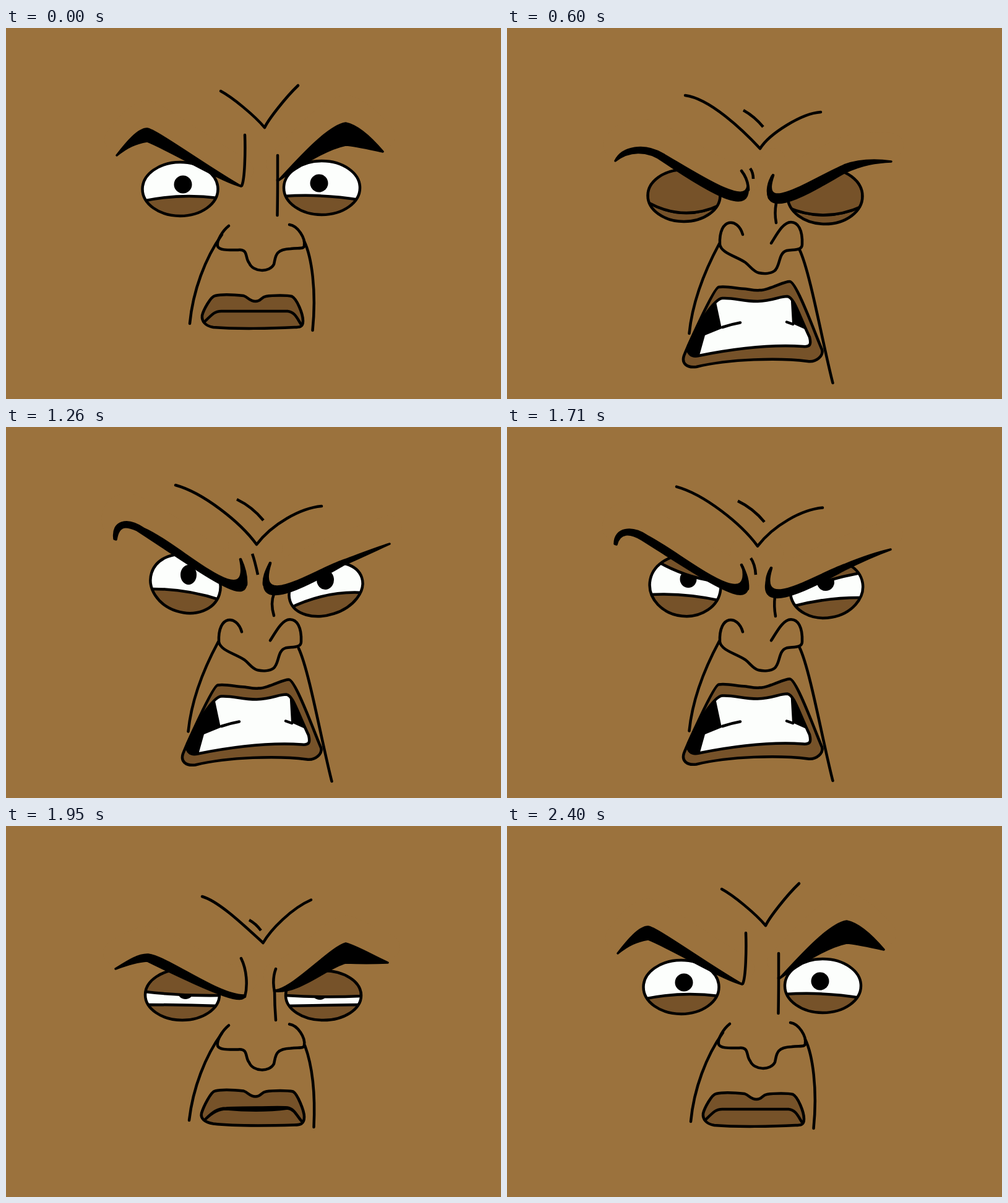
Animation of 800 by 600 pixels, one loop 2430 ms. Source, as an HTML page:

```html
<!DOCTYPE html>
<html lang="en">
<head>
<meta charset="utf-8">
<title>Angry face</title>
<style>
  html, body { margin: 0; width: 100%; height: 100%; overflow: hidden; background: #9b723d; }
  svg { display: block; width: 100vw; height: 100vh; }
  .line { fill: none; stroke: #000; stroke-width: 4.5; stroke-linecap: round; stroke-linejoin: round; }
  .butt { stroke-linecap: butt; }
  .brow { fill: #000; stroke-width: 3.5; }
  .cover { fill: #9b723d; stroke: #9b723d; stroke-width: 40; stroke-linejoin: round; }
  .lip { fill: #765229; }
  .white { fill: #fcfefc; }
</style>
</head>
<body>
<svg id="stage" viewBox="0 0 800 600"></svg>
<script>
const LOOP = 2430, STEP = 30;
const stage = document.getElementById('stage');

// Poses: A calm, B eyes shut, C snarl with eyes shut, D snarl, E lids dropping, F waking.
// "B+9" means pose B moved down by 9.
const shapes = {
  crease: {
    A: 'M347 102C366 112 402 142 418 161C424 148 452 112 472 93',
    B: 'M317 105C345 113 388 155 415.5 180C428 158 462 124 493 110.5',
    C: 'M288 109C328 114 382 166 409 195C424 171 476 138 507 136',
    D: 'M274 94C318 106 378 153 405 190C430 157 476 131 510 128',
    E: 'D+2.6', F: 'B+9' },
  tick: {
    A: 'M410 158Q410 158 410 158',
    B: 'M393 143Q404 149 412 160',
    C: 'M382 133Q400 143 414 160',
    D: 'M373 117Q398 129 416 151',
    E: 'D+2.6', F: 'B+9' },
  wrinkle: {
    A: 'M393 226Q393 226 393 226',
    B: 'A+0',
    C: 'M393 227Q398 234 398 244',
    D: 'M398 205Q402 216 407 239',
    E: 'M394 212Q401 222 402 239',
    F: 'A+0' },
  browLineL: {
    A: 'M386 173C387 200 386 245 381 255',
    B: 'M380 223C389 237 391 250 390 268',
    C: 'M379 231C386 240 390 250 390 262',
    D: 'M379 214C384 225 389 238 388 255',
    E: 'M379 223C386 238 390 248 389 262',
    F: 'M380 214C389 232 391 258 386 276' },
  browLineR: {
    A: 'M439 206C439 220 439 230 439 247',
    B: 'M433 235C427 247 424 262 432 271',
    C: 'M430 238C422 250 420 265 424 275',
    D: 'M427 220C420 234 416 244 417 255',
    E: 'M427 228C420 240 418 250 422 265',
    F: 'M436 231C432 242 431 254 434 268' },
  bridge: {
    A: 'M439 245Q439 270 438.5 303',
    B: 'M434 272Q434 292 435 314',
    C: 'M435 283Q432 300 435 315',
    D: 'M433 270Q427 285 433 305',
    E: 'M433 274Q431 290 434 306',
    F: 'M434 266Q434 290 436 314' },
  browL: {
    A: 'M179 206C196 184 214 163 228 163C240 163 330 228 380 256C340 244 270 200 228 183C210 186 196 192 179 206Z',
    B: 'M176 229C192 214 228 208 250 218C300 238 378 284 389 262C388 300 330 268 250 227C226 218 196 220 176 229Z',
    C: 'M175 215C186 192 222 186 252 204C310 238 386 288 389 256C393 300 345 278 252 215C226 196 196 198 175 215Z',
    D: 'M175 181C171 152 196 146 222 164C282 190 396 304 379 216C414 310 344 253 212 167C196 160 182 156 178 182Z',
    E: 'M174 189C174 163 202 160 226 176C284 206 396 304 381 226C414 312 340 259 218 182C198 170 182 170 177 190Z',
    F: 'M177 231C196 219 214 207 230 208C262 212 345 276 386 274C384 288 350 278 228 218C212 219 196 224 177 231Z' },
  browR: {
    A: 'M441 246C470 215 520 158 549 154C570 158 592 180 609 200C590 196 565 190 549 189C520 195 485 216 441 246Z',
    B: 'M429 262C434 284 505 234 550 212C575 209 600 216 621 220C600 223 575 223 550 226C505 250 426 292 427 262Z',
    C: 'M430 240C408 304 490 246 545 222C572 212 598 213 621 216C598 217 575 220 545 234C505 256 396 328 428 240Z',
    D: 'M427 222C404 296 490 236 545 216C572 206 598 196 620 189C598 199 575 210 545 223C505 246 384 318 426 222Z',
    E: 'M427 230C406 300 490 244 545 223C572 212 598 203 620 198C598 206 575 216 545 231C505 252 388 320 426 230Z',
    F: 'M436 266C465 262 525 196 549 190C570 196 592 210 617 221C595 222 570 222 549 221C520 228 475 270 436 267Z' },
  nose: {
    A: 'M360 320C350 328 340 344 342 353C345 360 360 359 375 359C392 357 386 372 393 380C399 395 426 396 433 382C436 370 434 358 460 357C472 355 482 358 482 352C484 340 472 320 458 318C458 318 458 318 458 318',
    B: 'M369 327C355 320 340 340 343 358C346 372 370 369 382 375C388 381 390 392 398 397C407 404 424 404 431 396C440 383 438 372 450 367C462 364 478 369 479 358C480 338 470 325 459 325C452 325 447 329 443 333',
    C: 'M381 334C373 306 342 306 344 350C346 364 370 369 385 379C394 386 398 394 407 396C416 398 426 397 432 393C442 386 438 364 452 360C464 358 477 360 477 350C478 326 470 314 459 314C446 314 436 334 427 348',
    D: 'C-2.7', E: 'C-2.7', F: 'A+2.5' },
  cheekL: {
    A: 'M349 334C322 372 302 425 297 478',
    B: 'M350 335C322 376 302 433 296 488',
    C: 'M343 349C322 388 300 440 294.5 494',
    D: 'C-1.5', E: 'C-2.5',
    F: 'M349 335C322 372 302 424 296 476' },
  cheekR: {
    A: 'M482 345C494 370 502 425 495.5 489',
    B: 'M480 352C494 385 500 440 497.5 499',
    C: 'M473 359C490 395 510 510 526.5 574',
    D: 'C-1', E: 'C-2',
    F: 'M483 355C496 390 500 435 497.5 487' },
  lips: {
    A: 'M338 433C350 430 375 432 384 433C392 436 394 442 403 442C413 442 412 435 420 434C432 432 455 432 462 434C470 438 480 462 480 474C480 484 474 484 466 484C430 486 370 487 335 484C322 482 316 474 317 465C319 456 331 434 338 433Z',
    B: 'M338 438C350 435 375 437 384 438C392 441 394 447 403 447C413 447 412 440 420 439C432 437 455 437 464 439C471 443 482 470 482 480C482 492 475 493 466 493C430 494 370 495 335 491C321 489 314 482 316 474C319 464 331 439 338 438Z',
    C: 'M342 419C358 417 372 422 386 422C394 423 400 425 408 424C416 424 420 422 426 420C440 415 450 410 457 410C468 410 500 500 509 520C512 530 500 541 486 539C440 533 360 535 306 548C290 550 282 542 286 530C290 520 334 420 342 419Z',
    D: 'C-1.5', E: 'C-2.5', F: 'B-9.5' },
  mouth: {
    A: 'M348 458C365 458 388 458 405 458C425 458 440 458 455 458C466 459 470 468 476 478C470 468 466 459 455 458C425 458 390 458 348 458C338 458 334 462 322 474C334 462 338 458 348 458Z',
    B: 'M356 466C372 465 388 465 405 465C425 465 440 464 455 465C466 467 470 478 477 486C470 478 466 467 455 466C425 470 390 470 356 467C344 467 334 472 322 484C334 472 342 466 356 466Z',
    C: 'M348 437C368 436 380 442 405 442C430 441 440 434 453 434C464 436 470 460 489 500C492 512 490 516 478 515C420 511 360 520 310 530C298 533 290 526 293 514C306 484 334 438 348 437Z',
    D: 'C-1.5', E: 'C-2.5', F: 'B-9.5' },
  // cx cy rx ry, lower lid, upper lid, pupil cx cy rx ry, tilt
  eyeL: {
    A: '281.5 260.5 61 43.5 280 267 275 200 200 200 286 253 14.5 14.5 0',
    B: '286 271 58.5 42 282 314 286 282 314 286 290 268 13 13 0',
    C: 'B+0',
    D: '290 253.5 57.5 46.5 262 261 280 194 194 194 295 239 13 16 18',
    E: '288 257 57.5 49 271 268 281 210 246 250 293 246 13.5 14 6',
    F: '285 273 60 41 289 289 291 268 275 274 290 267 13 13 0' },
  eyeR: {
    A: '510.5 258.5 61.5 43.5 272 268 278 200 200 200 506 251 14.5 14.5 0',
    B: '514 272 60.5 45 290 316 288 290 316 288 510 268 13 13 0',
    C: 'B+0',
    D: '517 262.5 61 41.5 294 264 268 200 200 200 516 247 14 16 -18',
    E: '516.5 262 59 46.5 291 275 276 268 246 235 515 251 14 14 -10',
    F: '513 274 61 40 291 290 289 274 278 275 507 268 13 13 0' }
};

const easeIn = k => k ** 1.7;
const easeOut = k => 1 - (1 - k) ** 2.5;
const linear = k => k;
const back = c => k => 1 + (c + 1) * (k - 1) ** 3 + c * (k - 1) ** 2;

// time, pose, easing on the way to it
const keys = [
  [0, 'A', linear], [60, 'A', linear], [450, 'B', easeIn], [600, 'C', easeOut],
  [840, 'D', back(1.7)], [1680, 'D', linear], [1710, 'E', linear], [1800, 'C', easeOut],
  [1950, 'F', linear], [2310, 'A', back(2)], [LOOP, 'A', linear]
];

const NUM = /-?\d+(?:\.\d+)?/g;
for (const part of Object.values(shapes)) {
  part.form = part.A.replace(NUM, '#');
  for (const pose of 'ABCDEF') {
    const ref = /^([A-F])([+-][\d.]+)$/.exec(part[pose]);
    part[pose] = ref
      ? part[ref[1]].map((n, i) => i % 2 ? n + +ref[2] : n)
      : part[pose].match(NUM).map(Number);
  }
}

function add(tag, cls, parent = stage, attrs = {}) {
  const el = document.createElementNS('http://www.w3.org/2000/svg', tag);
  if (cls) el.setAttribute('class', cls);
  set(el, attrs);
  return parent.appendChild(el);
}
function set(el, attrs) {
  for (const name in attrs) el.setAttribute(name, attrs[name]);
}

function makeEye(name) {
  const clip = add('ellipse', '', add('clipPath', '', stage, { id: name }));
  const white = add('ellipse', 'white');
  const inside = add('g', '', stage, { 'clip-path': `url(#${name})` });
  const pupil = add('ellipse', '', inside);
  const lids = [add('path', 'line lip', inside), add('path', 'line lip', inside)];
  const rim = add('ellipse', 'line');
  return n => {
    const [cx, cy, rx, ry] = n;
    const transform = `rotate(${n[14]} ${cx} ${cy})`;
    for (const el of [clip, white, rim]) set(el, { cx, cy, rx, ry, transform });
    set(pupil, { cx: n[10], cy: n[11], rx: n[12], ry: n[13] });
    const left = cx - rx, right = cx + rx;
    lids.forEach((lid, i) => {
      const [a, b, c] = n.slice(4 + i * 3);
      set(lid, { d: `M${left} ${a}Q${cx} ${b} ${right} ${c}V${i ? 150 : 350}H${left}Z` });
    });
  };
}

const eyes = { eyeL: makeEye('eyeL'), eyeR: makeEye('eyeR') };
const paths = {};
const draw = (name, cls, parent, attrs) =>
  (paths[name] ??= []).push(add('path', cls, parent, attrs));

// Skin above each brow hides the top of the eye.
for (const name of ['browL', 'browR']) draw(name, 'cover', stage, { transform: 'translate(0 -26)' });
for (const name of ['browL', 'browR']) draw(name, 'line brow');
for (const name of ['browLineL', 'browLineR', 'bridge', 'crease']) draw(name, 'line');
for (const name of ['tick', 'wrinkle']) draw(name, 'line butt');
for (const name of ['cheekL', 'cheekR', 'nose']) draw(name, 'line');
draw('lips', 'line lip');
draw('mouth', '');
draw('mouth', '', add('clipPath', '', stage, { id: 'gap' }));
const teeth = add('g', '', stage, { 'clip-path': 'url(#gap)' });
add('path', 'white', teeth, { d: 'M333 420L347 486L320 497L308 540H500L488 490L461 478L458 425Z' });
add('path', 'line', teeth, { d: 'M348 484Q363 479 377 476.5M452 475.5L462 479' });
draw('mouth', 'line');

function render(time) {
  const t = Math.floor(time % LOOP / STEP) * STEP;
  const i = keys.findIndex(key => key[0] > t);
  const [t0, from] = keys[i - 1], [t1, to, ease] = keys[i];
  const k = ease((t - t0) / (t1 - t0));
  for (const name in shapes) {
    const part = shapes[name];
    const nums = part[from].map((n, j) => n + (part[to][j] - n) * k);
    if (eyes[name]) { eyes[name](nums); continue; }
    let j = 0;
    const d = part.form.replace(/#/g, () => nums[j++].toFixed(2));
    for (const el of paths[name]) set(el, { d });
  }
}

const start = performance.now();
(function frame() {
  render(performance.now() - start);
  requestAnimationFrame(frame);
})();
</script>
</body>
</html>
```
